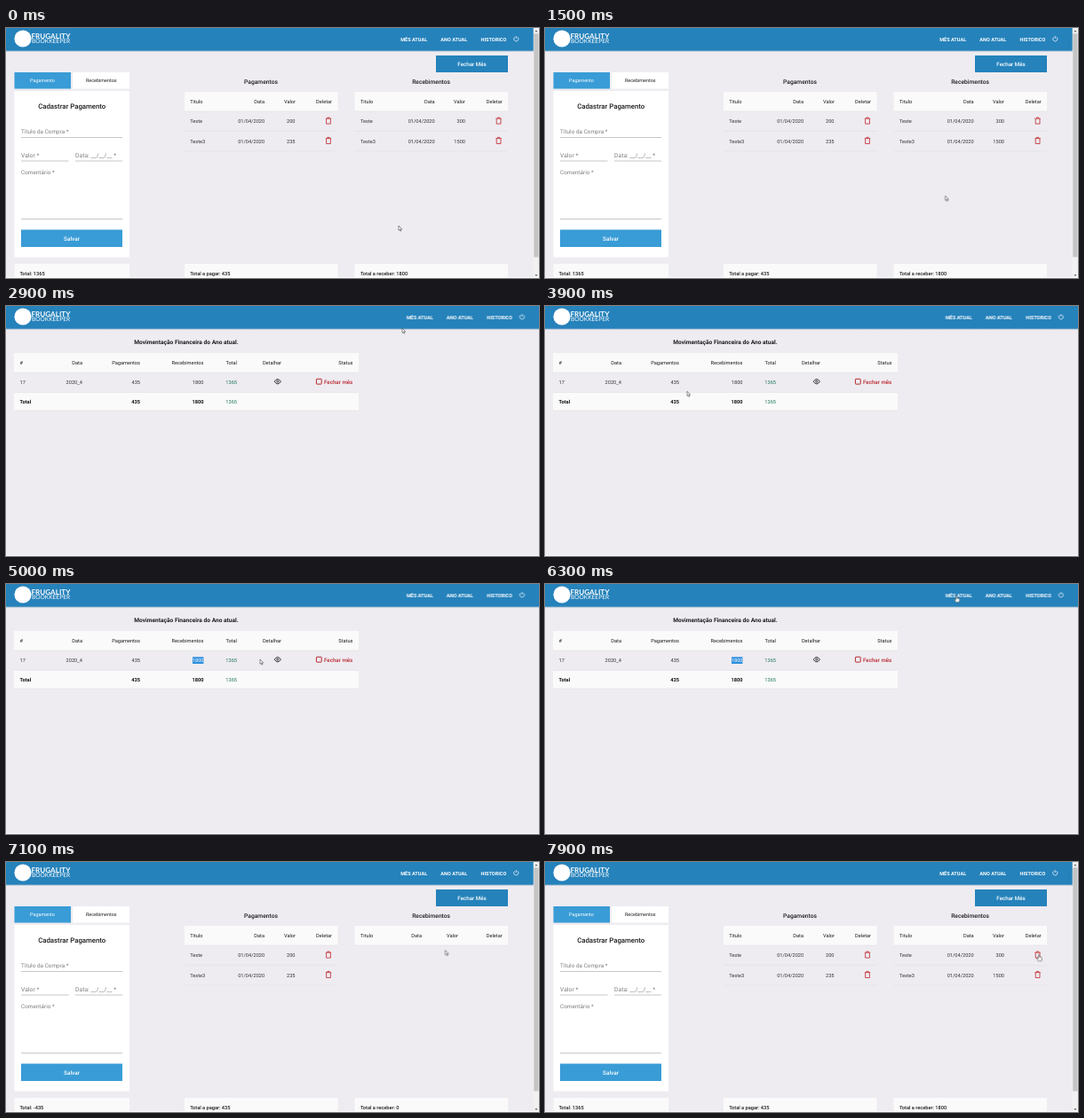
An HTML page for the animation above (8000 ms loop, 600 by 282 pixels).

```html
<!DOCTYPE html>
<html lang="pt">
<head>
<meta charset="utf-8">
<title>Controle mensal</title>
<style>
html, body { margin: 0; width: 100%; height: 100%; overflow: hidden; background: #eeecf1; }
svg { display: block; width: 600px; height: 282px; font: 5.65px Roboto, sans-serif; fill: #1e1e1e; text-rendering: geometricPrecision; }
.end { text-anchor: end; }
.mid { text-anchor: middle; }
.m { font-weight: 500; }
.b { font-weight: 700; }
.white { fill: #fff; }
.label { font-size: 6.3px; letter-spacing: .06px; fill: #7c7c7c; }
.h { font-size: 6.7px; font-weight: 500; }
.cell { fill: #333; }
.green { fill: #22785a; }
.red { fill: #b8282f; }
.card { fill: #fafafa; }
.line { stroke: #dfdde2; stroke-width: .5; }
.under { stroke: #8f8f8f; stroke-width: .5; }
.shade { filter: drop-shadow(0 .6px .7px #0003); }

.month, .year, .nav, .wait, .done, .pick, .arrow, .hand, .cursor { animation: 8s step-end infinite; }
.month { animation-name: month; }
.year { animation-name: year; }
.nav { animation-name: nav; }
.wait { animation-name: wait; }
.done { animation-name: done; }
.pick { animation-name: pick; }
.hand { animation-name: hand; }
.arrow { animation-name: arrow; }
.cursor { animation-name: move; }
@keyframes month { 0%, 81.25%, 100% { opacity: 1 } 32.5% { opacity: 0 } }
@keyframes year { 0%, 81.25%, 100% { opacity: 0 } 32.5% { opacity: 1 } }
@keyframes nav { 0%, 81.25%, 100% { transform: none } 32.5% { transform: translateX(6.6px) } }
@keyframes wait { 0%, 90%, 100% { opacity: 0 } 81.25% { opacity: 1 } }
@keyframes done { 0%, 90%, 100% { opacity: 1 } 81.25% { opacity: 0 } }
@keyframes pick { 0%, 81.25%, 100% { opacity: 0 } 56.25% { opacity: 1 } }
@keyframes hand { 0%, 33.75%, 81.25% { opacity: 0 } 27.5%, 72.5%, 95%, 100% { opacity: 1 } }
@keyframes arrow { 0%, 33.75%, 81.25% { opacity: 1 } 27.5%, 72.5%, 95%, 100% { opacity: 0 } }
/* the pointer advances ten times a second */
@keyframes move {
  0% { transform: translate(442px, 223px) }
  11.25% { transform: translate(442px, 223px); animation-timing-function: steps(1) }
  12.5% { transform: translate(445px, 215px) }
  17.5% { transform: translate(445px, 215px); animation-timing-function: steps(8) }
  27.5% { transform: translate(490px, 9px) }
  32.5% { transform: translate(490px, 9px); animation-timing-function: steps(3) }
  36.25% { transform: translate(446px, 25px) }
  40% { transform: translate(446px, 25px); animation-timing-function: steps(4) }
  45% { transform: translate(250px, 100px); animation-timing-function: steps(4) }
  50% { transform: translate(130px, 95px); animation-timing-function: steps(3) }
  53.75% { transform: translate(210px, 85px); animation-timing-function: steps(2) }
  56.25% { transform: translate(222px, 85px); animation-timing-function: steps(4) }
  61.25% { transform: translate(286px, 85px) }
  62.5% { transform: translate(286px, 85px); animation-timing-function: steps(2) }
  65% { transform: translate(304px, 84px); animation-timing-function: steps(6) }
  72.5% { transform: translate(463.3px, 13.5px) }
  81.25% { transform: translate(463.3px, 13.5px); animation-timing-function: steps(5) }
  87.5% { transform: translate(494.5px, 99.5px) }
  90% { transform: translate(494.5px, 99.5px); animation-timing-function: steps(4) }
  95%, 100% { transform: translate(556px, 104.5px) }
}
</style>
</head>
<body>
<svg viewBox="0 0 600 282">
  <defs>
    <g id="bin" fill="none" stroke="#c4393f" stroke-width=".9">
      <path d="M-3.2-2.4H3.2M-1.2-2.6V-3.6H1.2V-2.6M-2.4-2.2V3.5H2.4V-2.2"/>
    </g>
    <linearGradient id="fade" x2="0" y2="1">
      <stop stop-color="#6f9dbd"/>
      <stop offset="1" stop-color="#eeecf1"/>
    </linearGradient>
  </defs>
  <rect width="600" height="282" fill="#eeecf1"/>

  <rect y="25" width="600" height="2.2" fill="url(#fade)"/>
  <rect width="600" height="25.5" fill="#2582bb"/>
  <circle class="white" cx="19" cy="12" r="9.6"/>
  <g class="white" font-family="Lato, sans-serif">
    <text x="28.5" y="11.6" font-size="8.1" font-weight="700">FRUGALITY</text>
    <text x="29" y="17.4" font-size="6.6" font-weight="400">BOOKKEEPER</text>
  </g>
  <g class="nav white b" font-size="5.55">
    <text x="444.2" y="14.9">MÊS ATUAL</text>
    <text x="489.3" y="14.9">ANO ATUAL</text>
    <text x="534.5" y="14.9">HISTORICO</text>
    <path d="M572.8 10.2A2.6 2.6 0 1 0 575.8 10.2M574.3 9V12" fill="none" stroke="#fff" stroke-width=".7"/>
  </g>

  <g class="month">
    <g class="shade">
      <rect x="484" y="31" width="81" height="19" fill="#2582bb"/>
    </g>
    <text class="mid white m" x="524.5" y="43" font-size="6.2">Fechar Mês</text>

    <rect x="9.5" y="50" width="63.5" height="18.5" fill="#399cd6"/>
    <rect x="75" y="50" width="64" height="18.5" fill="#fff"/>
    <text class="mid white" x="41" y="61.3" font-size="5.45">Pagamento</text>
    <text class="mid" x="107.3" y="61.3" font-size="5.45">Recebimentos</text>

    <rect x="9.5" y="71" width="129.5" height="187.5" fill="#fff"/>
    <text class="mid m" x="74.2" y="90.6" font-size="7.8">Cadastrar Pagamento</text>
    <g class="label">
      <text x="17" y="119.4">Título da Compra *</text>
      <text x="17" y="145.6" font-size="6.7">Valor *</text>
      <text x="78" y="145.6" font-size="6.7">Data: __/__/__ *</text>
      <text x="17" y="164.6">Comentário *</text>
    </g>
    <path class="under" d="M17 123.5H131M17 150H70.5M78 150H131M17 215.5H131"/>
    <rect x="17" y="227.5" width="114" height="19.5" fill="#399cd6"/>
    <text class="mid white m" x="74" y="239.6" font-size="6.4">Salvar</text>

    <text class="mid h" x="287" y="62.7">Pagamentos</text>
    <rect class="card" x="201" y="72" width="172.5" height="22"/>
    <text x="207.2" y="85">Titulo</text>
    <g class="end">
      <text x="291" y="85">Data</text>
      <text x="326" y="85">Valor</text>
      <text x="367" y="85">Deletar</text>
    </g>
    <g class="cell">
      <text x="207.2" y="107.2">Teste</text>
      <text x="207.2" y="129.7">Teste3</text>
      <g class="end">
        <text x="291.2" y="107.2">01/04/2020</text>
        <text x="325.5" y="107.2">200</text>
        <text x="291.2" y="129.7">01/04/2020</text>
        <text x="325.5" y="129.7">235</text>
      </g>
    </g>
    <path class="line" d="M201 94H373.5M201 116.5H373.5M201 139H373.5"/>
    <use href="#bin" x="363" y="104.6"/>
    <use href="#bin" x="363" y="127"/>

    <text class="mid h" x="478.6" y="62.7">Recebimentos</text>
    <rect class="card" x="392.5" y="72" width="172.5" height="22"/>
    <path class="line" d="M392.5 94H565"/>
    <text x="399" y="85">Titulo</text>
    <text class="end" x="558.7" y="85">Deletar</text>

    <g class="card">
      <rect x="9.5" y="266" width="129.5" height="15.5"/>
      <rect x="201" y="266" width="172.5" height="15.5"/>
      <rect x="392.5" y="266" width="172.5" height="15.5"/>
    </g>
    <g class="m">
      <text x="207.2" y="279">Total a pagar: 435</text>
      <g class="done">
        <text x="15.5" y="279">Total: 1365</text>
        <text x="399" y="279">Total a receber: 1800</text>
      </g>
      <g class="wait">
        <text x="15.5" y="279">Total: -435</text>
        <text x="399" y="279">Total a receber: 0</text>
      </g>
    </g>
    <g class="wait end">
      <text x="468" y="85">Data</text>
      <text x="509" y="85">Valor</text>
    </g>
    <g class="done">
      <g class="end">
        <text x="482.7" y="85">Data</text>
        <text x="517" y="85">Valor</text>
      </g>
      <g class="cell">
        <text x="399" y="107.2">Teste</text>
        <text x="399" y="129.7">Teste3</text>
        <g class="end">
          <text x="482.7" y="107.2">01/04/2020</text>
          <text x="517" y="107.2">300</text>
          <text x="482.7" y="129.7">01/04/2020</text>
          <text x="517" y="129.7">1500</text>
        </g>
      </g>
      <path class="line" d="M392.5 116.5H565M392.5 139H565"/>
      <use href="#bin" x="554.6" y="104.6"/>
      <use href="#bin" x="554.6" y="127"/>
    </g>

    <rect x="593.7" width="6.3" height="282" fill="#f1f1f1"/>
    <rect x="594.3" y="6.4" width="5.2" height="252" fill="#c4c4c4"/>
    <path d="M595.4 4.2L596.9 2.4L598.4 4.2ZM595.4 278.2L596.9 280L598.4 278.2Z" fill="#505050"/>
  </g>

  <g class="year">
    <text class="mid b" x="203" y="43.4" font-size="6.62">Movimentação Financeira do Ano atual.</text>
    <rect class="card" x="9" y="53" width="388" height="22"/>
    <rect class="card" x="9" y="97.5" width="388" height="20.5"/>
    <path class="line" d="M9 75H397M9 97.5H397M9 118H397"/>
    <text x="15.6" y="65.8">#</text>
    <g class="end">
      <text x="86" y="65.8">Data</text>
      <text x="151" y="65.8">Pagamentos</text>
      <text x="222.5" y="65.8">Recebimentos</text>
      <text x="260" y="65.8">Total</text>
      <text x="310" y="65.8">Detalhar</text>
      <text x="390.5" y="65.8">Status</text>
    </g>
    <text class="cell" x="15.6" y="88.2">17</text>
    <g class="end cell">
      <text x="86" y="88.2">2020_4</text>
      <text x="151" y="88.2">435</text>
      <text x="222.5" y="88.2">1800</text>
      <text class="green" x="260" y="88.2">1365</text>
    </g>
    <g class="pick">
      <rect x="210" y="82.3" width="12.4" height="7.7" fill="#2f8fdd"/>
      <text class="end white" x="222.5" y="88.2">1800</text>
    </g>
    <path d="M302.2 85.2Q305.8 79.8 309.4 85.2Q305.8 90.6 302.2 85.2Z" fill="none" stroke="#222" stroke-width=".9"/>
    <circle cx="305.8" cy="85.2" r="1.1" fill="none" stroke="#222" stroke-width=".8"/>
    <rect x="349.4" y="82.3" width="5.8" height="5.8" rx=".5" fill="none" stroke="#b8282f" stroke-width="1"/>
    <text class="end red m" x="390.3" y="87.5" font-size="6.2">Fechar mês</text>
    <g class="b" fill="#111">
      <text x="15.6" y="110">Total</text>
      <text class="end" x="151" y="110">435</text>
      <text class="end" x="222.5" y="110">1800</text>
    </g>
    <text class="end green" x="260" y="110">1365</text>
  </g>

  <rect y="281.3" width="600" height=".7" fill="#fff"/>

  <g class="cursor" stroke="#222" stroke-width=".5" fill="#fff" stroke-linejoin="round">
    <path class="arrow" d="M0 0V5.3L1.2 4.2L2 6.1L2.9 5.7L2.1 3.9H3.7Z"/>
    <path class="hand" d="M-.7 .5Q0-.5 .7 .5V2.7L3.2 3.2Q3.8 3.4 3.6 4.6L2.9 7.1H-.7L-2.4 4.5Q-2.5 3.5-1.5 3.9L-.7 4.5Z"/>
  </g>
</svg>
</body>
</html>
```
